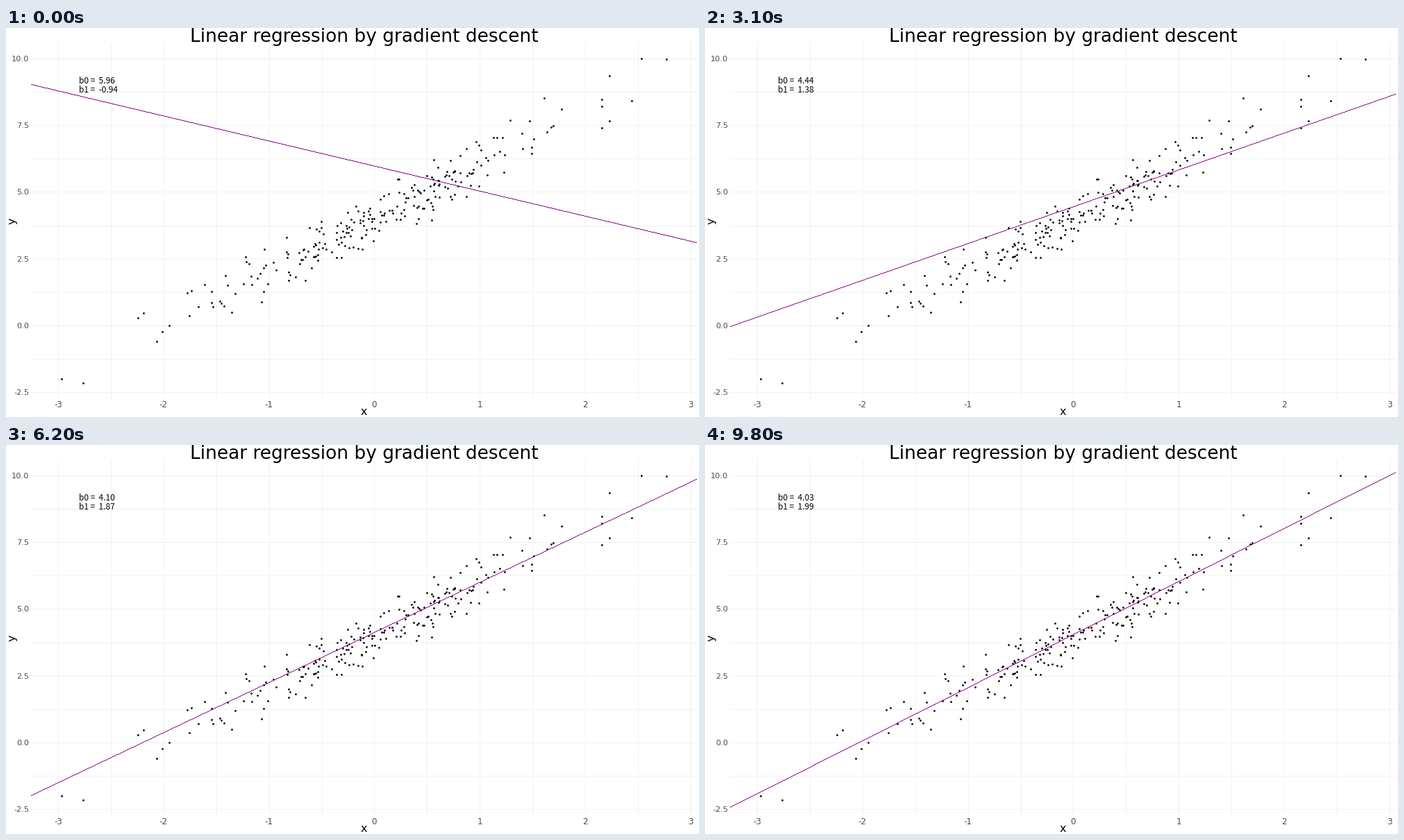
These frames come from a looping animation (998 by 561 pixels, 10 s). A matplotlib script:

```python
import numpy as np
import matplotlib.pyplot as plt
from matplotlib.animation import FuncAnimation

W, H = 998, 561
PT = 0.72  # points per pixel at 100 dpi
LEFT, RIGHT, TOP, BOTTOM = 36, 995, 20.5, 535
FRAMES = 100

fig = plt.figure(figsize=(W / 100, H / 100), dpi=100, facecolor="white")
ax = fig.add_axes([0, 0, 1, 1])
ax.set(xlim=(0, W), ylim=(H, 0))
ax.axis("off")


def px(x):
    return 530.5 + 151.85 * x


def py(y):
    return 428.9 - 38.5 * y


def label(x, y, text, size, color="black", font="DejaVu Sans", **kw):
    kw = {"ha": "center", "va": "baseline", **kw}
    return ax.text(x, y, text, fontsize=size * PT, color=color, family=font, **kw)


def draw_grid():
    style = dict(color="#f2f2f2", lw=PT, zorder=1)
    for v in np.arange(-3, 3.1, 0.5):
        ax.plot([px(v)] * 2, [TOP, BOTTOM], **style)
    for v in np.arange(-2.5, 10.1, 1.25):
        ax.plot([LEFT, RIGHT], [py(v)] * 2, **style)


def draw_labels():
    label(515.5, 20, "Linear regression by gradient descent", 26.4)
    for v in range(-3, 4):
        label(px(v), 547, str(v), 12, "#4d4d4d")
    for v in np.arange(-2.5, 10.1, 2.5):
        label(33.5, py(v) + 4, f"{v:.1f}", 11.4, "#4d4d4d", ha="right")
    label(515.5, 558, "x", 16)
    label(9.5, 278, "y", 16, rotation=90, va="center")


def sample_points(count=238):
    """Noisy samples around y = 4 + 2x, without the far tails."""
    rng = np.random.default_rng(12)
    x = rng.normal(0, 0.92, 2 * count)
    noise = rng.normal(0, 0.5, 2 * count)
    keep = (x > -2.2) & (x < 1.9) & (abs(noise) < 1.15)
    x, noise = x[keep][:count], noise[keep][:count]
    return np.column_stack([x, 4 + 2 * x + noise])


def draw_points():
    extremes = [(-2.97, -2.0), (-2.76, -2.15), (-2.24, 0.28), (1.61, 8.52),
                (2.16, 8.46), (2.16, 8.2), (2.16, 7.4), (2.23, 9.35),
                (2.23, 7.66), (2.44, 8.41), (2.53, 9.99), (2.77, 9.97)]
    x, y = np.vstack([extremes, sample_points()]).T
    ax.plot(px(x), py(y), "o", color="black", ms=2.8 * PT, mew=0, zorder=2)


draw_grid()
draw_labels()
draw_points()

# One pixel per column gives the fit a crisp, stepped edge
columns = np.arange(LEFT, RIGHT)
fit, = ax.plot([], [], ",", color="#8b008b", zorder=3)
notes = [label(105.5, y, "", 12, font="Noto Sans CJK JP", ha="left")
         for y in (80, 93)]


def coefficients(step):
    """Geometric convergence of intercept and slope."""
    return 4.01 + 1.95 * np.exp(-0.0488 * step), 2.01 - 2.95 * np.exp(-0.0497 * step)


def update(frame):
    b0, b1 = coefficients(min(frame, FRAMES - 2))
    start, end = np.round(py(b0 + b1 * np.array([-3.257, 3.06])))
    fit.set_data(columns, np.round(np.linspace(start, end, len(columns))))
    for i, (note, value) in enumerate(zip(notes, (b0, b1))):
        note.set_text(f"b{i} =  {value:.2f}")
    return [fit, *notes]


anim = FuncAnimation(fig, update, frames=FRAMES, interval=100, repeat=True,
                     repeat_delay=0, blit=False)
plt.show()
```
